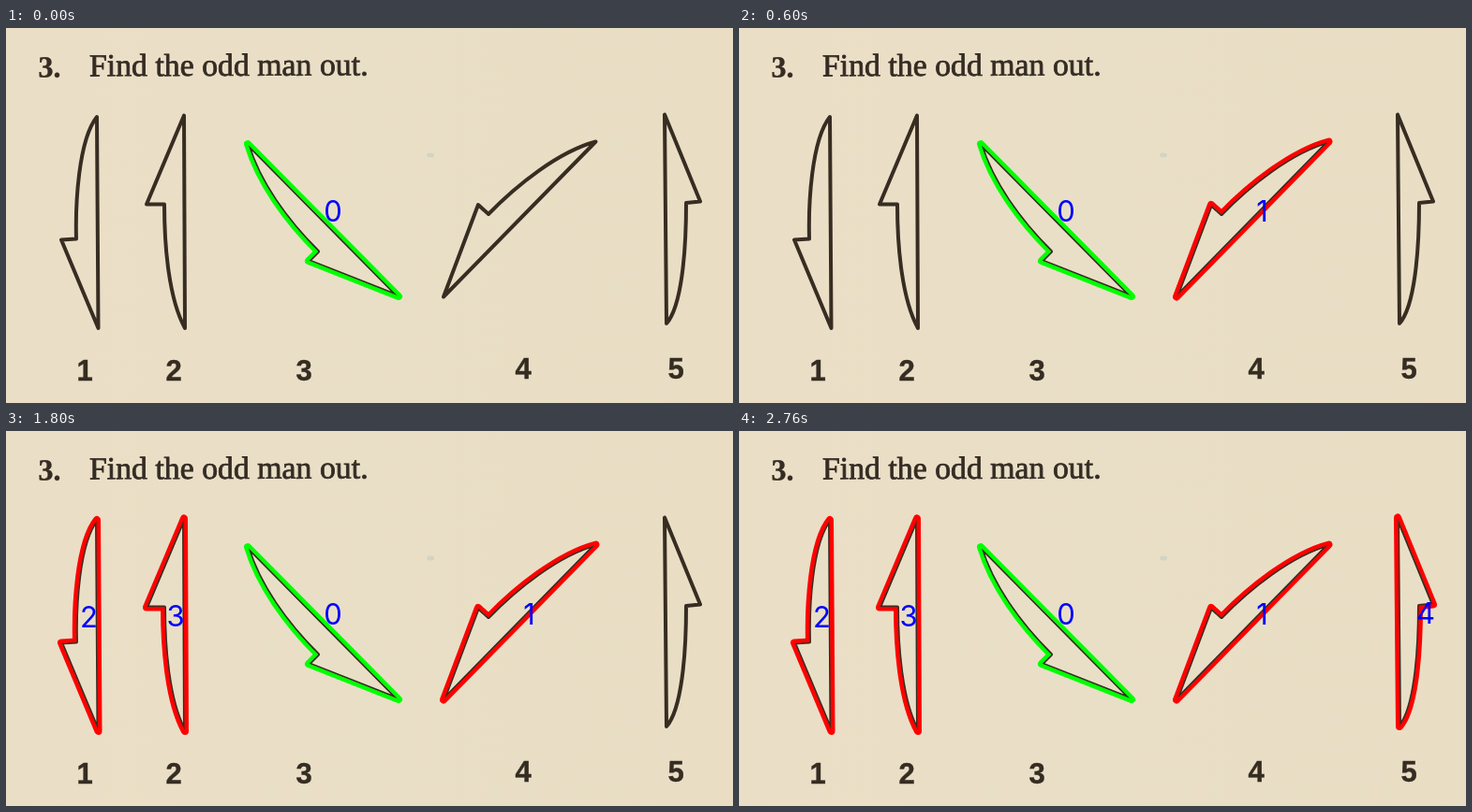
An HTML page for the animation above (3 s loop, 776 by 401 pixels).

```html
<!DOCTYPE html>
<html lang="en">
<head>
<meta charset="utf-8">
<title>Find the odd man out</title>
<style>
  html, body { margin: 0; width: 100%; height: 100%; overflow: hidden; background: #e9dfc6; }
  svg { display: block; width: 100%; height: 100%; }
  path { stroke-linejoin: round; stroke-linecap: round; }
  .ink { fill: none; stroke: #372d22; stroke-width: 4; }
  .head { font: 33.8px "Liberation Serif", serif; fill: #352c24; stroke: #352c24; stroke-width: .8; }
  .num { font: bold 32px "Liberation Serif", serif; fill: #352c24; stroke: #352c24; stroke-width: .4; }
  .label { font: bold 31px "Liberation Sans", sans-serif; fill: #352c22; stroke: #352c22; stroke-width: .4; text-anchor: middle; }
  .tag { font: 400 31px Inter, sans-serif; fill: #00f; text-anchor: middle; }
</style>
</head>
<body>
<svg id="stage" viewBox="0 0 776 401" preserveAspectRatio="none">
  <defs>
    <linearGradient id="paper">
      <stop offset="0" stop-color="#ebdec6"/>
      <stop offset=".5" stop-color="#e9dfc6"/>
      <stop offset="1" stop-color="#e9dec4"/>
    </linearGradient>
  </defs>
  <rect width="776" height="401" fill="url(#paper)"/>
  <ellipse cx="453" cy="136" rx="4" ry="2.5" fill="#c9cec2" opacity=".7"/>
  <g transform="rotate(-.2 210 50)">
    <text class="num" x="34.5" y="52">3.</text>
    <text class="head" x="89" y="51">Find the odd man out.</text>
  </g>
</svg>
<script>
const STEP = 600;
const RED = "#f00", GREEN = "#0f0";
const stage = document.getElementById("stage");

// Printed figures from left to right, each with its label position.
const figures = [
  { d: "M97 95L98.5 321L59 226.5L75 225.5C74 190 77 120 97 95Z", label: [84, 377] },
  { d: "M190 93.5L191 321C174 290 169 235 169 188.5L150 188.5Z", label: [179, 377] },
  { d: "M258 124L419 287L323 249L333 239C300 206 270 165 258 124Z", label: [318, 377] },
  { d: "M629.5 121.5L467 287.5L504 189L515 199C545 168 590 132 629.5 121.5Z", label: [552, 375] },
  { d: "M703 92.5L705 316C721 298 726 240 726 187L741 185.5Z", label: [715, 375] }
];

// Marks in the order they appear: figure index, colour, tag position.
const marks = [
  { fig: 2, color: GREEN, at: [349, 206.5] },
  { fig: 3, color: RED, at: [558.5, 206.5] },
  { fig: 0, color: RED, at: [88.5, 209.5] },
  { fig: 1, color: RED, at: [181, 209] },
  { fig: 4, color: RED, at: [733, 205.5] }
];

function add(parent, name, attrs, text) {
  const el = document.createElementNS("http://www.w3.org/2000/svg", name);
  for (const key in attrs) el.setAttribute(key, attrs[key]);
  if (text !== undefined) el.textContent = text;
  parent.appendChild(el);
  return el;
}

figures.forEach(({ d, label: [x, y] }, i) => {
  add(stage, "path", { d, class: "ink" });
  add(stage, "text", { x, y, class: "label" }, i + 1);
  const clip = add(stage, "clipPath", { id: "inside" + i });
  add(clip, "path", { d });
});

// A mark covers the outside of the line and leaves an inner edge of ink.
const groups = marks.map(({ fig, color, at: [x, y] }, i) => {
  const d = figures[fig].d;
  const g = add(stage, "g", {});
  add(g, "path", { d, fill: "none", stroke: color, "stroke-width": 8 });
  const inner = add(g, "g", { "clip-path": `url(#inside${fig})` });
  add(inner, "path", { d, fill: "#e9dfc6" });
  add(inner, "path", { d, class: "ink" });
  add(g, "path", { d, fill: "none", stroke: color, "stroke-width": 1 });
  add(g, "text", { x, y, class: "tag" }, i);
  return g;
});

function draw(time) {
  const last = Math.floor(time / STEP) % marks.length;
  groups.forEach((g, i) => g.setAttribute("visibility", i <= last ? "visible" : "hidden"));
}

const start = performance.now();
function tick() {
  draw(performance.now() - start);
  requestAnimationFrame(tick);
}
tick();
</script>
</body>
</html>
```
